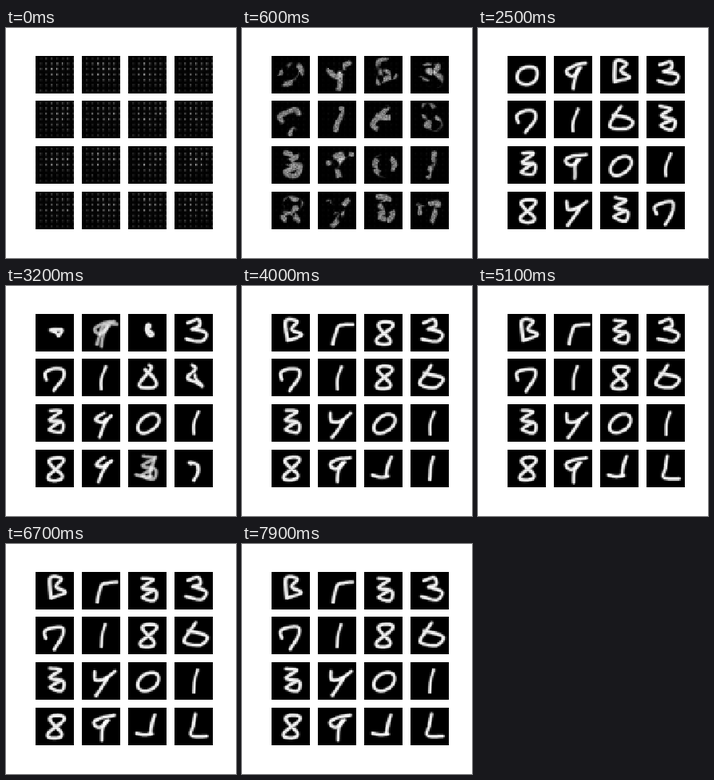
Write an HTML page with a canvas that moves like this. It is 288 by 288 pixels and loops after 8 s.

```html
<!DOCTYPE html>
<html lang="en">
<head>
<meta charset="utf-8">
<title>Generated digits</title>
<style>
html, body { margin: 0; width: 100%; height: 100%; overflow: hidden; background: #fff; }
canvas { display: block; width: 100vw; height: 100vh; }
</style>
</head>
<body>
<canvas id="stage" width="288" height="288"></canvas>
<script>
const LOOP = 8000, STEP = 100, N = 28, SAMPLES = 32, UNIT = N / 47.5;

const clamp = v => Math.max(0, Math.min(1, v));
const mix = (a, b, u) => a + (b - a) * u;
function rand(a, b, c = 0) {
  const s = Math.sin(a * 12.99 + b * 78.23 + c * 37.72) * 43758.55;
  return s - Math.floor(s);
}

function spline(p0, p1, p2, p3, u) {
  return p1 + u / 2 * (p2 - p0 + u * (2 * p0 - 5 * p1 + 4 * p2 - p3 + u * (3 * (p1 - p2) + p3 - p0)));
}

// Smooth stroke through x, y pairs.
function curve(...n) {
  const last = n.length / 2 - 1;
  const at = (i, k) => n[2 * Math.max(0, Math.min(last, i)) + k];
  return Array.from({ length: SAMPLES }, (_, s) => {
    const f = s / (SAMPLES - 1) * last, i = Math.min(last - 1, Math.floor(f));
    return [0, 1].map(k => spline(at(i - 1, k), at(i, k), at(i + 1, k), at(i + 2, k), f - i));
  });
}

function loop(fn) {
  return Array.from({ length: SAMPLES }, (_, s) => fn(s / (SAMPLES - 1) * 2 * Math.PI));
}

const GLYPHS = {
  zero: [loop(a => [25 + 13 * Math.cos(a), 24.5 + 11 * Math.sin(a) - 4 * Math.cos(a)])],
  eight: [loop(a => [25 + 9 * Math.sin(2 * a) + 2 * Math.cos(a), 24 - 14.5 * Math.cos(a)])],
  bee: [curve(19, 33, 18, 8, 32, 9, 25, 19, 37, 26, 19, 33)],
  one: [curve(29, 10, 25, 24, 24, 38)],
  two: [curve(17, 11, 29, 7, 32, 15, 22, 19), curve(24, 19, 39, 25, 33, 35, 14, 31)],
  seven: [curve(13, 27, 11, 19, 20, 14, 33, 14, 33, 25, 23, 41)],
  gamma: [curve(43, 13, 32, 14, 24, 18, 19, 38)],
  wye: [curve(16, 12, 17, 22, 29, 21, 41, 12), curve(32, 19, 26, 30, 18, 42)],
  nine: [curve(40, 10, 24, 13, 15, 19, 22, 25, 33, 16), curve(30, 17, 26, 27, 25, 41)],
  jay: [curve(33, 9, 29, 22, 27, 33), curve(10, 32, 20, 34, 29, 33)],
  ell: [curve(26, 8, 23, 22, 21, 35, 40, 36)],
  star: [curve(26, 8, 20, 17, 12, 32, 32, 36, 40, 25, 17, 18)],
  knot: [curve(18, 8, 31, 10, 18, 20, 34, 24, 32, 36, 18, 32, 32, 23)]
};

// Each tile settles through three shapes.
const tiles = [
  "zero bee bee", "nine gamma gamma", "bee eight knot", "two two two",
  "seven seven seven", "one one one", "star eight eight", "knot star star",
  "knot knot knot", "nine wye wye", "zero zero zero", "one one one",
  "eight eight eight", "wye nine nine", "knot jay jay", "seven one ell"
].map(s => s.split(" ").map(name => GLYPHS[name]));

const view = document.getElementById("stage").getContext("2d");
const small = document.createElement("canvas");
small.width = small.height = N;
const pen = small.getContext("2d", { willReadFrequently: true });
pen.lineCap = pen.lineJoin = "round";

// Bends strokes; the bend calms down as training goes on.
function warp([x, y], seed, t, frame) {
  const amp = 2.4 * Math.exp(-t / 2600), p = seed * 2.1 + t / 1500;
  const jit = k => (rand(seed, frame, k) - .5) * .6;
  return [
    (x + amp * Math.sin(y / 6 + p) + jit(1)) * UNIT,
    (y + amp * Math.sin(x / 6 + p * 1.3) + jit(2)) * UNIT
  ];
}

function strokes(shape, alpha, width, seed, t, frame) {
  pen.strokeStyle = "#fff";
  for (const pts of shape) {
    pen.beginPath();
    pts.forEach(p => pen.lineTo(...warp(p, seed, t, frame)));
    for (const [extra, a] of [[1, .28], [-.2, .9]]) {
      pen.lineWidth = width + extra;
      pen.globalAlpha = alpha * a;
      pen.stroke();
    }
  }
}

function morph(a, b, u) {
  return a.map((s, k) => s.map((p, i) => p.map((v, j) => mix(v, b[k][i][j], u))));
}

function patches(x, y, seed) {
  const gx = x / 4, gy = y / 4, i = Math.floor(gx), j = Math.floor(gy);
  const r = (a, b) => rand(i + a, j + b, seed + 5);
  return mix(mix(r(0, 0), r(1, 0), gx - i), mix(r(0, 1), r(1, 1), gx - i), gy - j);
}

function lattice(x, y, seed) {
  const glow = .2 + .8 * Math.exp(-((x - 16) ** 2 + (y - 10) ** 2) / 90);
  const across = Math.exp(-(((x + 1) % 4 - .3) ** 2) / .45);
  const down = Math.exp(-((y % 4 - 1.3) ** 2) / .7);
  return 255 * glow * (.04 + across * down) * (.4 + .6 * rand(x >> 2, y >> 2, seed));
}

// Early texture: a dot lattice, then patchy blobs.
function texture(seed, t, frame) {
  const img = pen.getImageData(0, 0, N, N), d = img.data;
  const dots = Math.exp(-t / 260), torn = clamp((2300 - t) / 900), rough = .8 * clamp(1 - t / 1200);
  for (let i = 0; i < N * N; i++) {
    const x = i % N, y = Math.floor(i / N);
    const keep = clamp((patches(x, y, seed) - .42) * 6 + .5);
    const v = d[4 * i] * mix(1, keep, torn) * (1 - rough * rand(x, y, seed + frame))
      + dots * lattice(x, y, seed);
    d[4 * i] = d[4 * i + 1] = d[4 * i + 2] = v;
  }
  pen.putImageData(img, 0, 0);
}

function drawTile(keys, seed, t, frame) {
  pen.globalAlpha = 1;
  pen.fillStyle = "#000";
  pen.fillRect(0, 0, N, N);
  const late = t > 4000, a = keys[late ? 1 : 0], b = keys[late ? 2 : 1];
  const u = late ? clamp((t - 4000) / 1000) : clamp((t - 2500) / 1400);
  const shown = clamp((t - 50) / 900);
  const thin = a === GLYPHS.one && b === a ? 2 : 2.4;
  const width = mix(3.8, thin, clamp((t - 1000) / 1300));
  const paint = (shape, alpha) => alpha > 0 && strokes(shape, shown * alpha, width, seed, t, frame);
  if (a.length === b.length) paint(morph(a, b, u), 1);
  else {
    paint(a, clamp(1.35 * (1 - u)));
    paint(b, clamp(1.35 * u));
  }
  if (t < 2300) texture(seed, t, frame);
}

function draw(now) {
  const frame = Math.floor(now % LOOP / STEP);
  view.fillStyle = "#fff";
  view.fillRect(0, 0, 288, 288);
  view.imageSmoothingEnabled = false;
  tiles.forEach((keys, i) => {
    drawTile(keys, i, frame * STEP, frame);
    view.drawImage(small, 37 + 58 * (i % 4), Math.round(34.7 + 56.7 * Math.floor(i / 4)), 48, 47);
  });
}

const start = performance.now();
function tick() {
  draw(performance.now() - start);
  requestAnimationFrame(tick);
}
tick();
</script>
</body>
</html>
```
